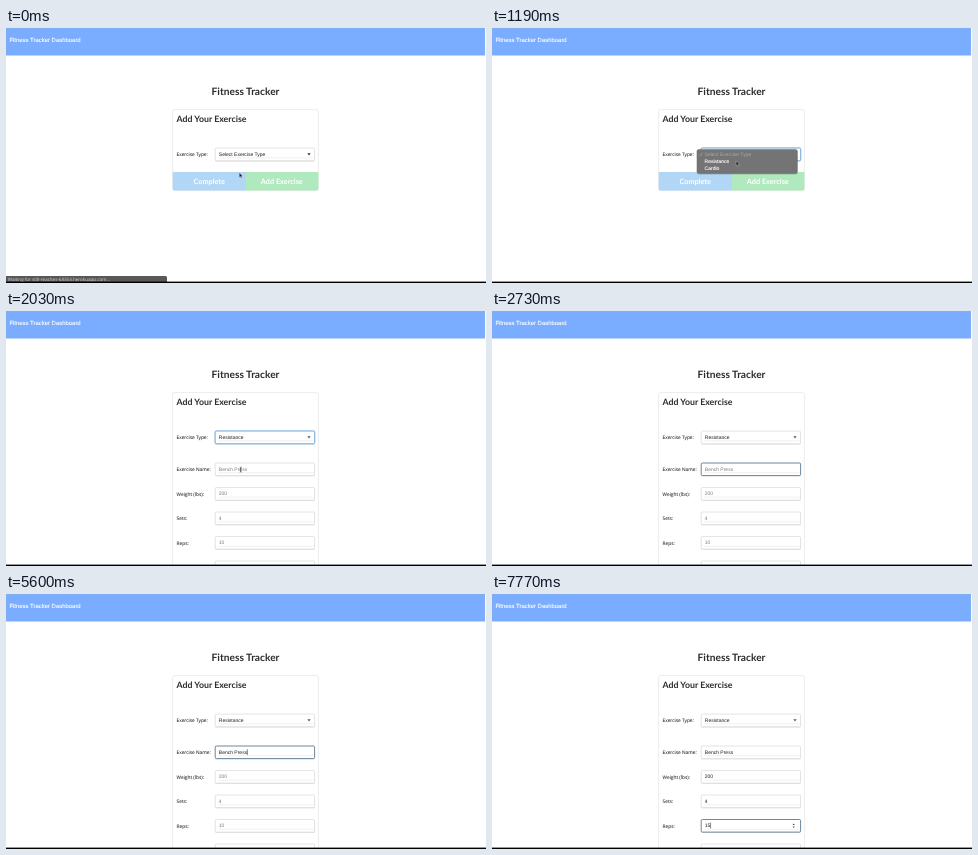
An HTML page that plays this animation: 480 by 255 pixels, repeating every 8000 ms.

```html
<!DOCTYPE html>
<html lang="en">
<head>
<meta charset="utf-8">
<title>Fitness Tracker</title>
<style>
  html, body { margin: 0; width: 100%; height: 100%; overflow: hidden; background: #fff; }
  svg { display: block; width: 100%; height: 100%; }
  text { text-rendering: geometricPrecision; white-space: pre; }
  .ui { font: 4.8px "Open Sans", sans-serif; fill: #262626; stroke: #262626; stroke-width: .06; }
  .field { font: 5px "Liberation Sans", Arial, sans-serif; fill: #1c1c1c; }
  .head { font-family: Lato, sans-serif; font-weight: 700; fill: #2b2c2d; }
  .box { fill: #fff; stroke: #d0d0d0; stroke-width: .55; }
  .glow { fill: none; stroke: #9cc6f0; stroke-width: 1.6; opacity: .7; }
</style>
</head>
<body>
<svg viewBox="0 0 480 255">
  <rect width="480" height="255" fill="#fff"/>
  <rect x=".1" y=".1" width="478.8" height="27.1" fill="#7aadff" stroke="#6c98de" stroke-width=".3"/>
  <text class="field" x="3.4" y="14.2" style="font-size:5.95px;fill:#fff" stroke="#fff" stroke-width=".12">Fitness Tracker Dashboard</text>
  <text class="head" x="239.5" y="67" font-size="10.2" text-anchor="middle">Fitness Tracker</text>
  <rect id="card" x="166.6" y="81.6" width="145.8" rx="2" fill="#fff" stroke="#dedfdf" stroke-width=".6"/>
  <text class="head" x="170.6" y="94.2" font-size="8.78">Add Your Exercise</text>
  <g id="buttons">
    <path d="M240 144H166.7V160.7Q166.7 162.5 168.5 162.5H240Z" fill="#b2d6f6"/>
    <path d="M240 144H312.4V160.7Q312.4 162.5 310.6 162.5H240Z" fill="#b1e9be"/>
    <g class="head" font-size="7.3" text-anchor="middle" style="fill:#fff">
      <text x="203.2" y="156.2">Complete</text>
      <text x="275.8" y="156.2">Add Exercise</text>
    </g>
  </g>
  <g id="rows"></g>
  <g id="menu">
    <rect x="204.8" y="121.8" width="101" height="24.6" rx="2" fill="#000" opacity=".18"/>
    <rect x="205" y="121.4" width="100.3" height="24" rx="1.8" fill="#747474" stroke="#606060" stroke-width=".4"/>
    <path d="M207.6 126.6l1 1.4l1.8-3.4" fill="none" stroke="#aaa" stroke-width=".6"/>
    <g class="field" style="fill:#fff">
      <text x="212.6" y="128.2" style="fill:#a9a9a9">Select Exercise Type</text>
      <text x="212.6" y="135" stroke="#fff" stroke-width=".12">Resistance</text>
      <text x="212.6" y="141.8" stroke="#fff" stroke-width=".12">Cardio</text>
    </g>
  </g>
  <g id="status">
    <path d="M0 248H159.5Q161 248 161 249.5V254H0Z" fill="#585858"/>
    <text class="ui" x="1.8" y="252.7" style="font-size:4.55px;fill:#d4d4d4;stroke:none">Waiting for still-reaches-68354.herokuapp.com...</text>
  </g>
  <path id="arrow" d="M0 0V4.6L1.1 3.7L1.9 5.4L2.7 5L1.9 3.4H3.3Z" fill="#111" stroke="#fff" stroke-width=".3"/>
  <path id="beam" d="M-1-2.6Q0-2.6 0-2V2Q0 2.6-1 2.6M1-2.6Q0-2.6 0-2V2Q0 2.6 1 2.6" fill="none" stroke="#333" stroke-width=".5"/>
  <rect y="253.6" width="480" height="1.4" fill="#000"/>
</svg>
<script>
const LOOP = 8000;
const MENU_OPEN = 350, MENU_CLOSE = 1470, EXPAND = 1540, BEAM_HIDE = 2520;
const $ = id => document.getElementById(id);
const show = (el, on) => el.setAttribute("display", on ? "inline" : "none");

// keys: the moment each successive character appears
const fields = [
  { label: "Exercise Type:", y: 119.7, select: true, focus: [MENU_OPEN, 2170] },
  { label: "Exercise Name:", y: 151.6, hint: "Bench Press", value: "Bench Press", focus: [2170, 5880],
    keys: [3780, 4130, 4270, 4410, 4550, 4830, 4970, 5110, 5250, 5390, 5600] },
  { label: "Weight (lbs):", y: 176.1, hint: "200", value: "200", focus: [5880, 6650], keys: [6230, 6370, 6510], number: true },
  { label: "Sets:", y: 200.6, hint: "4", value: "4", focus: [6650, 7350], keys: [7210], number: true },
  { label: "Reps:", y: 225.1, hint: "10", value: "15", focus: [7350, LOOP], keys: [7630, 7770], number: true },
  { label: "", y: 249.6, hint: "", value: "", focus: [LOOP, LOOP], keys: [] }
];

const path = [[0, 233.3, 144.8], [70, 233.8, 143.5], [280, 243, 129], [490, 244.6, 128.4], [840, 244.3, 129.6],
  [1050, 244.3, 129.6], [1190, 244.2, 133], [1470, 243.6, 133.6], [1610, 242, 139], [1820, 237, 153], [2030, 234.7, 158.6]];

function cursorAt(t) {
  const i = path.findIndex(p => p[0] > t);
  if (i < 0) return path[path.length - 1].slice(1);
  const [a, b] = [path[i - 1], path[i]];
  const k = (t - a[0]) / (b[0] - a[0]);
  return [a[1] + (b[1] - a[1]) * k, a[2] + (b[2] - a[2]) * k];
}

for (const f of fields) {
  const g = document.createElementNS("http://www.w3.org/2000/svg", "g");
  const { y } = f;
  const frame = `x="209.2" y="${y + .4}" width="99.4" height="12.6" rx="1.2"`;
  g.innerHTML = `
    <text class="ui" x="170.6" y="${y + 8.4}">${f.label}</text>
    <rect x="209" y="${y + 1}" width="99.8" height="13" rx="1.3" fill="#e8e8e8"/>
    <rect class="glow" ${frame}/>
    <rect class="box" ${frame}/>
    <path d="M212.5 ${y + 10.1}H307.5" stroke="#e0e0e0" stroke-width=".5"/>
    <text class="field" x="212.8" y="${y + 8.3}"></text>
    <path class="caret" stroke="#111" stroke-width=".5"/>
    <path class="mark" fill="#444" d="${f.select
      ? `M301.3 ${y + 5.6}h3.4l-1.7 2.1z`
      : `M300.6 ${y + 6}h2.2l-1.1-1.6zm0 1.3h2.2l-1.1 1.6z`}"/>`;
  $("rows").append(g);
  Object.assign(f, { g, box: g.querySelector(".box"), glow: g.querySelector(".glow"),
    text: g.querySelector(".field"), caret: g.querySelector(".caret"), mark: g.querySelector(".mark") });
}

function drawField(f, t) {
  const focused = t >= f.focus[0] && t < f.focus[1];
  f.box.style.stroke = !focused ? "" : f.select ? "#6fa3d6" : "#4a6a84";
  f.box.style.strokeWidth = focused ? .8 : "";
  show(f.glow, f.select && focused);
  show(f.g, f.select || t >= EXPAND);
  if (f.select) {
    f.text.textContent = t < MENU_CLOSE ? "Select Exercise Type" : "Resistance";
    f.mark.style.fill = t < EXPAND ? "#333" : "#42667a";
    show(f.caret, false);
    return;
  }
  const typed = f.keys.filter(k => k <= t);
  const value = f.value.slice(0, typed.length);
  f.text.textContent = value || f.hint;
  f.text.style.fill = value ? "" : "#7c7c7c";
  show(f.mark, f.number && focused);
  const idle = t - Math.max(f.focus[0] + 70, ...typed);
  const caretOn = focused && (idle < 0 || Math.floor(idle / 490) % 2 === 0);
  show(f.caret, caretOn);
  if (caretOn) {
    const x = 213 + (value ? f.text.getComputedTextLength() : 0);
    f.caret.setAttribute("d", `M${x} ${f.y + 3.6}v5.8`);
  }
}

function draw(t) {
  $("card").setAttribute("height", t < EXPAND ? 81 : 190);
  show($("buttons"), t < EXPAND);
  show($("menu"), t >= MENU_OPEN && t < MENU_CLOSE);
  show($("status"), t < 210);
  fields.forEach(f => drawField(f, t));

  const [x, y] = cursorAt(t);
  const overInput = t >= EXPAND && y > 152;
  show($("arrow"), !overInput);
  show($("beam"), overInput && t < BEAM_HIDE);
  for (const id of ["arrow", "beam"]) $(id).setAttribute("transform", `translate(${x} ${y})`);
}

function tick() {
  draw(performance.now() % LOOP);
  requestAnimationFrame(tick);
}
tick();
</script>
</body>
</html>
```
